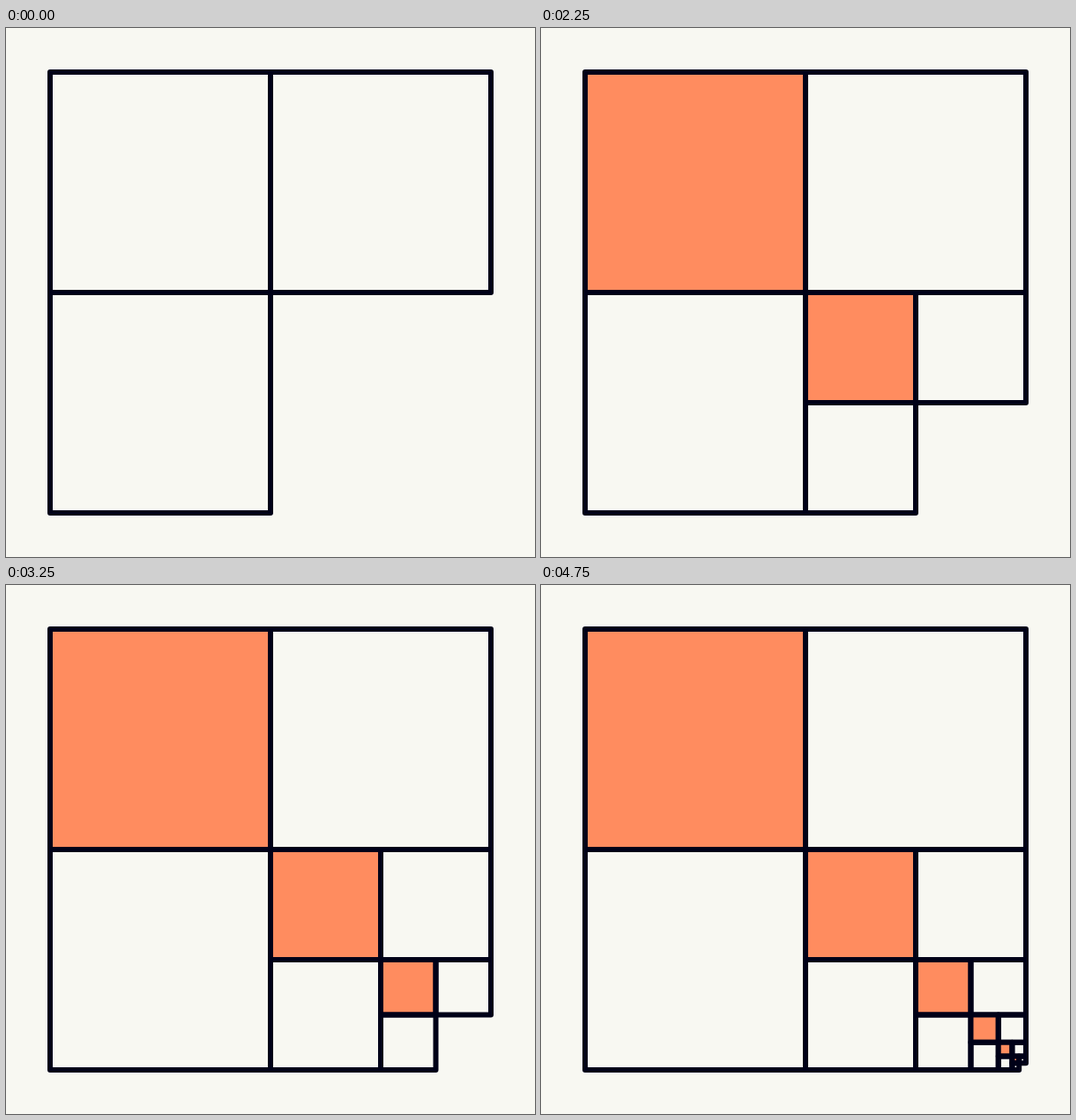
An HTML page with a canvas for the animation above (6080 ms loop, 600 by 600 pixels).

```html
<!DOCTYPE html>
<html lang="en">
<head>
<meta charset="utf-8">
<title>Quartered squares</title>
<style>
  html, body { margin: 0; width: 100%; height: 100%; overflow: hidden; background: #f8f8f2; }
  canvas { display: block; width: 600px; height: 600px; }
</style>
</head>
<body>
<canvas id="stage" width="600" height="600"></canvas>
<script>
const ctx = document.getElementById('stage').getContext('2d');
const LOOP = 6080, LEVELS = 6;
const PAPER = '#f8f8f2', INK = '#000118', CORAL = '#ff8c5f';

// Times at which a level's squares appear and its first square is filled
const showAt = k => k < 3 ? [0, 2000, 3000][k] : 2000 + 500 * k;
const fillAt = k => k ? showAt(k) + 250 : 1000;

function drawLevel(k, t) {
  const size = 250 / 2 ** k;
  const a = 550 - 2 * size;
  const b = 550 - size;
  if (t >= fillAt(k)) {
    ctx.fillStyle = CORAL;
    ctx.fillRect(a, a, size, size);
  }
  for (const [x, y] of [[a, a], [b, a], [a, b]]) ctx.strokeRect(x, y, size, size);
}

function draw(t) {
  ctx.fillStyle = PAPER;
  ctx.fillRect(0, 0, 600, 600);
  ctx.strokeStyle = INK;
  ctx.lineWidth = 6;
  ctx.lineJoin = 'round';
  for (let k = 0; k < LEVELS && t >= showAt(k); k++) drawLevel(k, t);
}

const start = performance.now();
function tick() {
  draw((performance.now() - start) % LOOP);
  requestAnimationFrame(tick);
}
tick();
</script>
</body>
</html>
```
